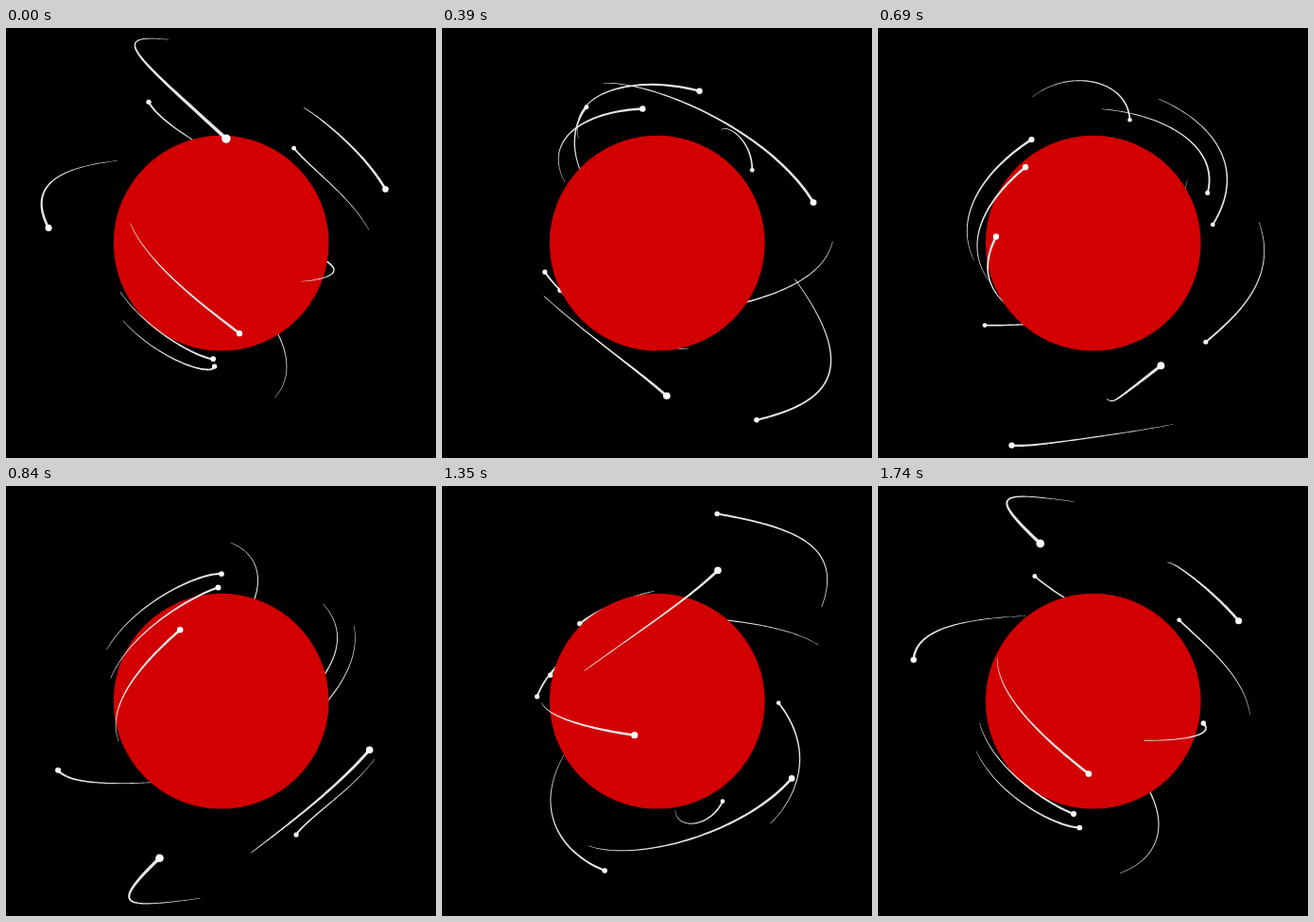
Animation, 455 px wide and 455 px high, one loop 1.77 s. Source, as an HTML page with a canvas:

```html
<!DOCTYPE html>
<html lang="en">
<head>
<meta charset="utf-8">
<title>Orbits</title>
<style>
html, body { margin: 0; width: 100%; height: 100%; overflow: hidden; background: #000; }
canvas { display: block; width: 455px; height: 455px; }
</style>
</head>
<body>
<canvas id="stage" width="455" height="455"></canvas>
<script>
const ctx = document.getElementById('stage').getContext('2d');

const STEP_MS = 30;
const STEPS = 59;             // the loop wraps one step short of a full turn
const TURN = Math.PI / 30;    // rotation per step
const CENTER = 227.7;
const CAMERA = 458;
const BALL = 113.9;
const LIMB_Z = 27;            // depth of the ball's visible outline
const TRAIL = 9;              // trail length in steps
const PARTS = 54;
const DOT = 2.65;
const LINE = 2.1;
const TAPER = 0.8;

// One key point per orbit: x right, y down, z towards the viewer.
// All motion follows from the double rotation in project().
const points = [
  [3, -63, 197], [-77, -150, -2], [-136, -12, 117], [88, -115, -66],
  [137, -45, 97], [114, 18, -27], [16, 79, 79], [-8, 115, 28],
  [-7, 129, 5], [21, 53, -171], [-65, -79, -121], [-78, -28, -115]
];

// Turn about the x axis, then by the same angle about the y axis
function project([px, py, pz], step) {
  const c = Math.cos(step * TURN), s = Math.sin(step * TURN);
  const y = py * c + pz * s;
  const depth = pz * c - py * s;
  const x = px * c + depth * s;
  const z = depth * c - px * s;
  const scale = CAMERA / (CAMERA - z);
  return { x: CENTER + x * scale, y: CENTER + y * scale, scale, front: z > LIMB_Z };
}

// Points from head to tail, each with the offset to the ribbon's edge
function makeTrail(point, step) {
  const list = [];
  for (let i = 0; i <= PARTS; i++) list.push(project(point, step - TRAIL * i / PARTS));
  list.forEach((p, i) => {
    const a = list[Math.max(0, i - 1)], b = list[Math.min(PARTS, i + 1)];
    const dx = b.x - a.x, dy = b.y - a.y;
    const width = LINE * p.scale * (1 - TAPER * i / PARTS);
    const half = width / 2 / (Math.hypot(dx, dy) || 1);
    p.nx = -dy * half;
    p.ny = dx * half;
  });
  return list;
}

function disc(x, y, r, color) {
  ctx.fillStyle = color;
  ctx.beginPath();
  ctx.arc(x, y, r, 0, Math.PI * 2);
  ctx.fill();
}

function drawLayer(trails, front) {
  ctx.fillStyle = '#e6e6e6';
  ctx.beginPath();
  for (const list of trails) {
    for (let i = 0; i < PARTS; i++) {
      const a = list[i], b = list[i + 1];
      if (a.front !== front) continue;
      ctx.moveTo(a.x + a.nx, a.y + a.ny);
      ctx.lineTo(b.x + b.nx, b.y + b.ny);
      ctx.lineTo(b.x - b.nx, b.y - b.ny);
      ctx.lineTo(a.x - a.nx, a.y - a.ny);
      ctx.closePath();
    }
  }
  ctx.fill();
  for (const [head] of trails) {
    if (head.front === front) disc(head.x, head.y, DOT * head.scale, '#fff');
  }
}

function draw(step) {
  const trails = points.map(p => makeTrail(p, step));
  ctx.fillStyle = '#000';
  ctx.fillRect(0, 0, 455, 455);
  drawLayer(trails, false);
  disc(CENTER, CENTER, BALL, '#d20000');
  drawLayer(trails, true);
}

const start = performance.now();
function tick() {
  const time = Math.max(0, performance.now() - start);
  draw(Math.floor(time / STEP_MS) % STEPS);
  requestAnimationFrame(tick);
}
tick();
</script>
</body>
</html>
```
